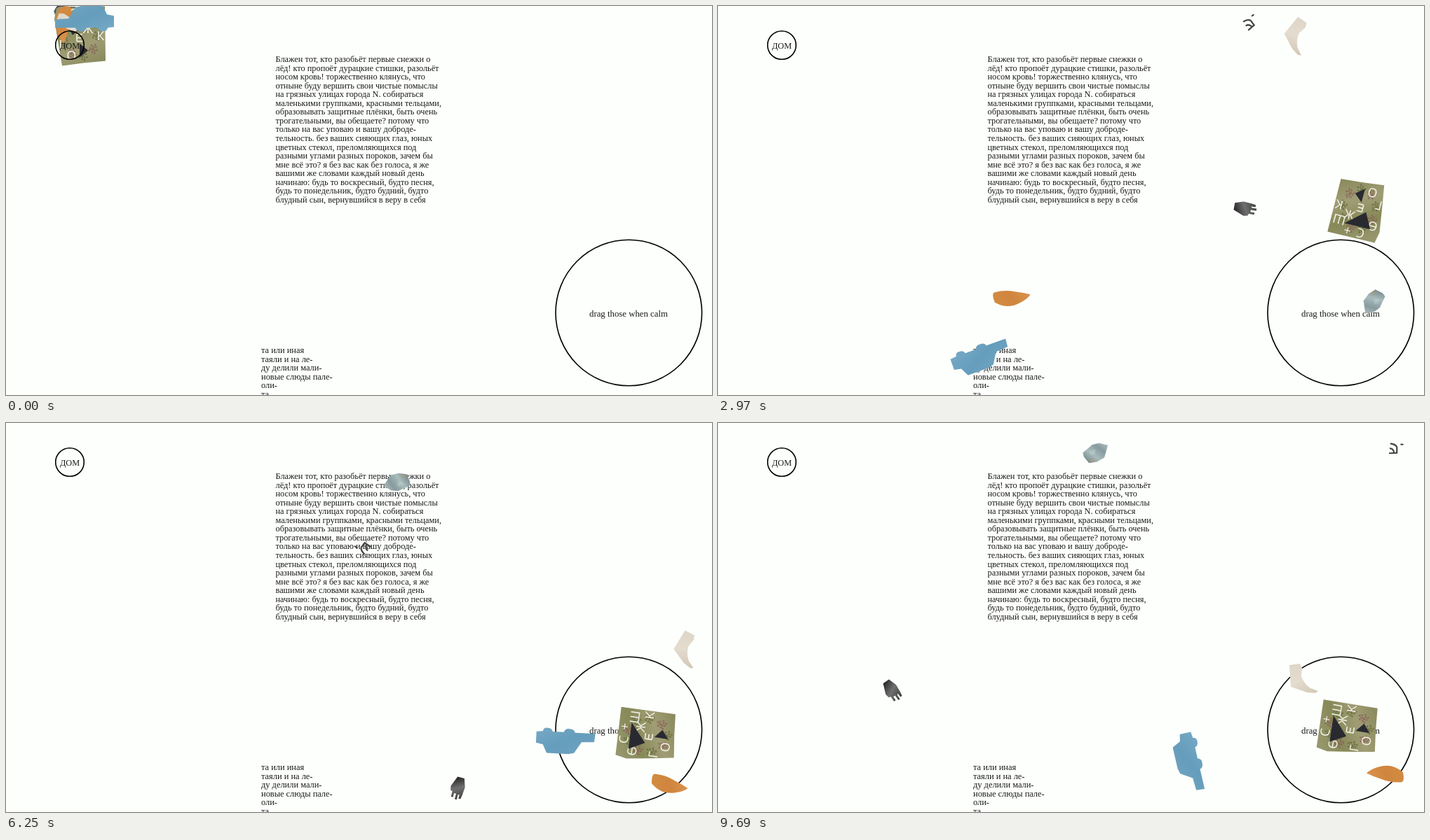
Write an HTML page with a canvas that moves like this. It is 1007 by 556 pixels and loops after 9.77 s.

```html
<!DOCTYPE html>
<html lang="ru">
<head>
<meta charset="utf-8">
<style>
html, body { margin: 0; width: 100%; height: 100%; overflow: hidden; background: #fdfffc; }
canvas { display: block; }
</style>
</head>
<body>
<canvas id="stage" width="1007" height="556"></canvas>
<script>
const ctx = document.getElementById('stage').getContext('2d');
const LOOP = 9770, START = 330, STEP = 80, LEAD = 12.56;
const TIMES = [250, 1290, 2970, 5130, 7370, 8730, 9690];
const WALLS = { left: 22, right: 975, top: 22, bottom: 530 };
const CALM = { x: 888.3, y: 438.5, r: 104.3 };

const poem = `Блажен тот, кто разобьёт первые снежки о
лёд! кто пропоёт дурацкие стишки, разольёт
носом кровь! торжественно клянусь, что
отныне буду вершить свои чистые помыслы
на грязных улицах города N. собираться
маленькими группками, красными тельцами,
образовывать защитные плёнки, быть очень
трогательными, вы обещаете? потому что
только на вас уповаю и вашу доброде-
тельность. без ваших сияющих глаз, юных
цветных стекол, преломляющихся под
разными углами разных пороков, зачем бы
мне всё это? я без вас как без голоса, я же
вашими же словами каждый новый день
начинаю: будь то воскресный, будто песня,
будь то понедельник, будто будний, будто
блудный сын, вернувшийся в веру в себя`.split('\n');
const verse = ['та или иная', 'таяли и на ле-', 'ду делили мали-', 'новые слюды пале-', 'оли-', 'та'];

let seed = 7;
const rand = () => (seed = seed * 16807 % 2147483647) / 2147483647;

function text(str, x, y, size, align = 'left') {
  ctx.font = `${size}px "Liberation Serif", serif`;
  ctx.textAlign = align;
  ctx.fillStyle = '#1a1a1a';
  ctx.fillText(str, x, y);
}

function ring(x, y, r) {
  ctx.beginPath();
  ctx.arc(x, y, r, 0, 7);
  ctx.strokeStyle = '#000';
  ctx.lineWidth = 1.6;
  ctx.stroke();
}

function shape(fill, d) {
  ctx.fillStyle = fill;
  ctx.fill(new Path2D(d));
}

function line(color, width, d) {
  ctx.strokeStyle = color;
  ctx.lineWidth = width;
  ctx.stroke(new Path2D(d));
}

function shade(size, ...colors) {
  const g = ctx.createLinearGradient(-size / 2, -size, size / 2, size);
  colors.forEach((c, i) => g.addColorStop(i / (colors.length - 1), c));
  return g;
}

// A sunflower-like cluster of soft dots.
function blot(color, x, y, r) {
  ctx.fillStyle = color;
  for (let i = 0; i < 12; i++) {
    const a = i * 2.4, d = r * Math.sqrt(i / 12);
    ctx.beginPath();
    ctx.arc(x + d * Math.cos(a), y + d * Math.sin(a), r / 5, 0, 7);
    ctx.fill();
  }
}

function hand() {
  shape(shade(16, '#1c1c1c', '#707070', '#3a3a3a'),
    'M-4 -16L6 -16 10 -4 9 8 8 14 5 14 5 8 3 9 3 16 0 16 0 8 -3 8 -3 14 -6 14 -6 6 -9 5 -10 -1z');
}

function rock() {
  shape(shade(18, '#74878a', '#a9bcbd', '#879b9f', '#b4c3c2'),
    'M-9 -17L2 -20 8 -19 13 -2 11 8 3 18 -11 6 -12 -6z');
  blot('#b49a78', -7, -12, 3);
  blot('#c3d0cf', 3, -6, 4);
}

function glyph() {
  line('#444', 2.2, 'M-7 -5L-5 6 3 5Q7 3 7 -5M0 -5Q1 0 -5 2');
  shape('#333', 'M7 9l2 1 0 4-2-1z');
}

function map() {
  shape(shade(40, '#96966c', '#878958', '#a09d75', '#8b8b5e'),
    'M-34 -40L35 -42 36 36 4 39 -26 43 -31 14 -37 -24z');
  for (let i = 0; i < 9; i++) {
    const a = i * 0.7, tone = i % 2 ? '#8a5a58b0' : '#6f7446';
    blot(tone, 24 * Math.cos(a), 29 * Math.sin(a), 7);
  }
  ctx.font = '500 18px "Noto Sans", sans-serif';
  ctx.textAlign = 'center';
  ctx.textBaseline = 'middle';
  ctx.fillStyle = '#f1f1e6';
  [...'ӨС+ШК  ОГ'].forEach((c, i) => {
    const a = (210 + 38 * i) * Math.PI / 180;
    ctx.fillText(c, 29 * Math.cos(a), 33 * Math.sin(a));
  });
  ctx.fillText('Ж', 11, -9);
  line('#f1f1e6', 1.6, 'M-5 -2h8M-5 3h7M-5 8h8M-5 -2v10');
  shape('#292a30', 'M-23 -23L15 -24 -11 -1z M-1 11L11 21 -1 31z');
}

function leaf() {
  shape(shade(25, '#d48c43', '#cf853d', '#dc9550'),
    'M-3 -25Q9 -28 11 -24Q13 -8 8 6Q5 18 1 27Q-5 22 -9 10Q-16 -9 -3 -25z');
}

function boot() {
  shape(shade(20, '#ded6c8', '#e4dccf', '#d5cbbb'),
    'M-20 -19L-5 -21 -2 -15 -3 -3Q1 8 10 14L21 18 17 21 5 20 -18 12z');
}

function car() {
  shape(shade(30, '#72a5c1', '#659dbc', '#76a9c5'),
    'M-42 13L-41 1 -23 0 -13 -16 -5 -18 26 -18 32 -6 42 -4 42 12 33 13Q32 19 26 18Q20 18 19 13L3 13Q1 19 -5 18Q-12 18 -13 13z');
}

// Long flights glance off one wall: the goal is mirrored behind it and folded back when drawn.
function mirror(x, y) {
  return [[2 * WALLS.left - x, y], [2 * WALLS.right - x, y],
    [x, 2 * WALLS.top - y], [x, 2 * WALLS.bottom - y]][Math.floor(rand() * 4)];
}
const fold = (v, lo, hi) => v < lo ? 2 * lo - v : v > hi ? 2 * hi - v : v;
const isCalm = ([x, y]) => Math.hypot(x - CALM.x, y - CALM.y) < CALM.r + 30;

// Points are [x, y, degrees]; a point without an angle gets a random turn.
const pieces = [];
function piece(draw, width, height, ...points) {
  let turn = points[0][2];
  const poses = [[70 + width / 2, height / 2, turn]];
  for (const [x, y, a] of points) poses.push([x, y, turn = a ?? turn + 300 * (rand() - 0.5)]);
  const legs = poses.slice(1).map((to, i) => {
    const from = poses[i], t0 = TIMES[i], t1 = TIMES[i + 1];
    const bounces = t1 - t0 > 1500 && !(isCalm(from) && isCalm(to));
    const goal = bounces ? [...mirror(to[0], to[1]), to[2]] : to;
    return { from, goal, t0, t1, bounces };
  });
  pieces.push({ draw, legs });
}

piece(hand, 31, 21, [284, 192, 70], [752, 290], [556, 375], [732, 391], [270, 217], [248, 383]);
piece(rock, 30, 32, [283, 227, -35], [933, 424], [897, 282], [215, 157], [292, 302], [541, 42]);
piece(glyph, 15, 11, [263, 206, 180], [757, 26], [429, 480], [596, 166], [744, 529], [963, 37]);
piece(map, 72, 85, [328, 286, 0], [914, 291, -165], [916, 437, -13], [912, 456, -150], [919, 428, -80], [899, 437, -80]);
piece(leaf, 23, 53, [266, 254, 0], [419, 417, -98], [941, 519, -17], [951, 516, -138], [943, 501, -168], [952, 501, -267]);
piece(boot, 53, 32, [313, 211, -62], [829, 43, 43], [815, 302, 98], [813, 345, -28], [875, 358, 49], [835, 365, 0]);
piece(car, 84, 36, [353, 231, 0], [375, 502, 160], [773, 440, 137], [419, 470, 229], [795, 422, 252], [672, 485, 257]);

function place({ legs }, t) {
  const { from, goal, t0, t1, bounces } = legs.find(leg => t <= leg.t1);
  const k = Math.max(0, (t - t0) / (t1 - t0));
  const [x, y, deg] = from.map((v, i) => v + (goal[i] - v) * k);
  if (!bounces) return [x, y, deg];
  return [fold(x, WALLS.left, WALLS.right), fold(y, WALLS.top, WALLS.bottom), deg];
}

function render(now) {
  const time = now % LOOP;
  const t = time < START ? 0 : START + STEP * Math.floor((time - START) / STEP);
  ctx.fillStyle = '#fdfffc';
  ctx.fillRect(0, 0, 1007, 556);
  poem.forEach((s, i) => text(s, 384.5, 80 + i * LEAD, 12.3));
  verse.forEach((s, i) => text(s, 364, 496 + i * LEAD, 12.4));
  ring(CALM.x, CALM.y, CALM.r);
  text('drag those when calm', 888, 443.5, 12.8, 'center');
  for (const p of pieces) {
    const [x, y, deg] = place(p, t);
    ctx.save();
    ctx.translate(x, y);
    ctx.rotate(deg * Math.PI / 180);
    p.draw();
    ctx.restore();
  }
  ring(91, 56, 20.3);
  text('ДОМ', 91, 60.5, 12.3, 'center');
  requestAnimationFrame(render);
}
requestAnimationFrame(render);
</script>
</body>
</html>
```
